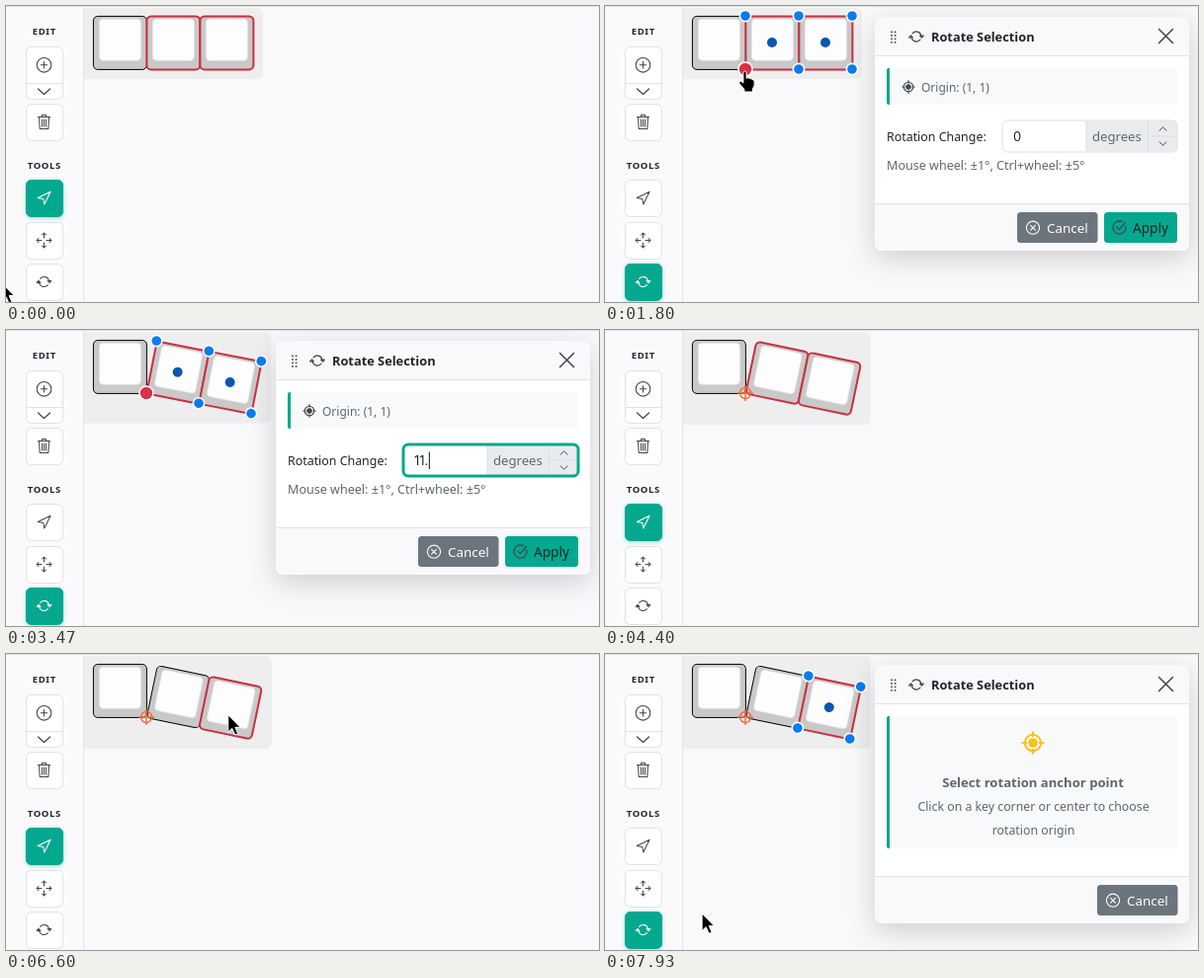
An HTML page that plays this animation: 600x300 px, repeating every 8 s.

```html
<!DOCTYPE html>
<html lang="en">
<head>
<meta charset="utf-8">
<title>Rotate selection</title>
<style>
html, body { margin: 0; width: 100%; height: 100%; overflow: hidden; background: #f9f9fb; }
svg { display: block; width: 600px; height: 300px; font-family: "Noto Sans", "Open Sans", sans-serif; }
.icon { fill: none; stroke: #3f454b; stroke-linejoin: round; stroke-linecap: round; }
.btn > rect { fill: #fff; stroke: #dfe2e6; }
.btn.on > rect { fill: #04a88e; stroke: #04a88e; }
.btn.on { filter: drop-shadow(0 1px 2px rgba(4, 168, 142, .4)); }
.btn.on .icon { stroke: #fff; }
.head { font-size: 9.5px; font-weight: 700; letter-spacing: .6px; fill: #23282d; }
.cap { fill: #c9c9c9; stroke: #000; }
.picked .cap { stroke: #cb2f41; stroke-width: 2; }
.dot { fill: #0a7cf0; stroke: #fff; stroke-width: 1.6; }
.mid { fill: #0a57ae; }
.window { filter: drop-shadow(0 8px 14px rgba(0, 0, 0, .17)); }
.muted { fill: #5f676e; }
.dark { fill: #212529; }
.light { fill: #fff; }
.light .icon, .icon.light { stroke: #fff; fill: none; }
.b { font-weight: 600; }
</style>
</head>
<body>
<svg id="stage" viewBox="0 0 600 300"></svg>
<script>
const ICONS = {
  add: "M-7.3 0A7.3 7.3 0 1 1 7.3 0A7.3 7.3 0 1 1-7.3 0M-3.2 0H3.2M0-3.2V3.2",
  trash: "M-6-5H6M-2-5V-7H2V-5M-5-5L-4.3 7H4.3L5-5M-2-2.5V4.5M0-2.5V4.5M2-2.5V4.5",
  select: "M6.5-6.3L-6.3 0L-.7 1L.3 6.5Z",
  move: "M0-7.5V-2.5M0 2.5V7.5M-7.5 0H-2.5M2.5 0H7.5M-2-5.5L0-7.5L2-5.5M-2 5.5L0 7.5L2 5.5M-5.5-2L-7.5 0L-5.5 2M5.5-2L7.5 0L5.5 2",
  rotate: "M-3.9-3.2A5 5 0 0 1 4.9-1M3.9 3.2A5 5 0 0 1-4.9 1M3.7-1H7.3L5.5 1.2ZM-3.7 1H-7.3L-5.5-1.2Z",
  cancel: "M-6.6 0A6.6 6.6 0 1 1 6.6 0A6.6 6.6 0 1 1-6.6 0M-2.4-2.4L2.4 2.4M2.4-2.4L-2.4 2.4",
  apply: "M6.4-1.5A6.6 6.6 0 1 1 3-5.9M-2.8-.6L-.2 2.2L6-5",
  close: "M-7-7L7 7M7-7L-7 7",
  down: "M-6-2.5L0 3L6-2.5",
  tick: "M-3.5 1.7L0-1.7L3.5 1.7"
};
const icon = (name, x, y, w = 1, extra = "") =>
  `<path class="icon ${extra}" stroke-width="${w}" transform="translate(${x} ${y})" d="${ICONS[name]}"/>`;
const rect = (x, y, w, h, r, attrs) => `<rect x="${x}" y="${y}" width="${w}" height="${h}" rx="${r}" ${attrs}/>`;
const text = (s, x, y, size, cls = "dark", attrs = "") =>
  `<text class="${cls}" x="${x}" y="${y}" font-size="${size}" ${attrs}>${s}</text>`;
const dot = (x, y, r = 5.6, cls = "dot") => `<circle class="${cls}" cx="${x}" cy="${y}" r="${r}"/>`;
const button = (id, y) =>
  `<g class="btn" id="${id}">${rect(20.5, y + .5, 37, 37, 5, "")}${icon(id, 38.5, y + 18.5, 1.05)}</g>`;
const key = i => {
  const x = 88.4 + 54 * i;
  return `<g id="key${i}">${rect(x, 10.4, 54, 54, 4.5, 'class="cap"')}
    ${rect(x + 6, 13.2, 42, 42, 4, 'fill="#fdfdfd" stroke="#e6e6e6" stroke-width=".8"')}</g>`;
};
const corners = x => [10, 64].map(y => dot(x, y)).join("");
const centre = 'text-anchor="middle"';

const target = (x, y, k, color) => `<g transform="translate(${x} ${y}) scale(${k})" fill="none" stroke="${color}" stroke-width="2">
  <circle r="8.2"/><circle r="3.8" fill="${color}"/><path d="M0-11.5V-6M0 6V11.5M-11.5 0H-6M6 0H11.5"/></g>`;

const cancel = (x, y) => `<g class="light">${rect(x, y, 81.5, 31, 3.5, 'fill="#6c757d"')}
  ${icon("cancel", x + 16, y + 15.7, 1.1)}${text("Cancel", x + 30, y + 20.8, 13.4, "light")}</g>`;

const frame = bottom => `<rect class="window" x="273" y="11" width="318" height="${bottom - 11}" rx="7" fill="#fff"/>
  <path d="M273 50V18a7 7 0 0 1 7-7H584a7 7 0 0 1 7 7V50ZM273 ${bottom - 48}V${bottom - 7}a7 7 0 0 0 7 7H584a7 7 0 0 0 7-7V${bottom - 48}Z" fill="#f9f9fb"/>
  <path d="M273 50.5H591M273 ${bottom - 47.5}H591" stroke="#dfe2e6"/>
  <path d="M290 25.5V38M293.6 25.5V38" stroke="#555" stroke-width="1.7" stroke-dasharray="1.7 1.8"/>
  ${icon("rotate", 315, 31, 1.2)}${text("Rotate Selection", 330, 36, 12.8, "dark b")}
  ${icon("close", 567.5, 30.5, 1.5)}`;
const notice = h => rect(285, 63, 294, h, 4, 'fill="#f8f9fa"') +
  `<path d="M288 63V${63 + h}H287a2 2 0 0 1-2-2V65a2 2 0 0 1 2-2Z" fill="#04a88e"/>`;

stage.innerHTML = `
  <rect width="600" height="300" fill="#f9f9fb"/>
  <rect id="board" x="73" y="2" rx="6" fill="#eeeeef"/>
  <rect width="78" height="300" fill="#fafafc"/>
  <path d="M0 .5H600M78.5 0V300" stroke="#e3e4e8"/>
  ${text("EDIT", 38.8, 29, 9.5, "head", centre)}${text("TOOLS", 38.8, 165, 9.5, "head", centre)}
  <g class="btn">${rect(20.5, 41.5, 37, 53, 5, "")}<path d="M20.5 78.5H57.5" stroke="#dfe2e6"/>
    ${icon("add", 38.5, 59.8, 1.05)}${icon("down", 38.5, 86.5, 1.2)}</g>
  ${button("trash", 99)}${button("select", 176)}${button("move", 219)}${button("rotate", 261)}
  ${key(0)}
  <g id="spun">${key(1)}${key(2)}
    <g id="firstDots">${corners(142)}${dot(169, 37, 5, "mid")}</g>
    <g id="lastDots">${corners(196)}${corners(250)}${dot(223, 37, 5, "mid")}</g>
  </g>
  <circle id="anchor" cx="142" cy="64" r="7" fill="#d7324a" stroke="#fff" stroke-width="1.6"/>
  <g id="origin" fill="none" stroke="#f0683c" stroke-width="1.4"><circle cx="142" cy="64" r="5.5"/><path d="M134 64H150M142 56V72"/></g>
  <g id="ask">${frame(273)}${notice(134)}${target(433, 90, 1, "#fcc21b")}
    ${text("Select rotation anchor point", 433, 135, 13.1, "muted b", centre)}
    ${text("Click on a key corner or center to choose", 433.5, 159, 12.3, "muted", centre)}
    ${text("rotation origin", 433.5, 183, 12.3, "muted", centre)}${cancel(498, 234)}</g>
  <g id="form">${frame(248)}${notice(37)}${target(307, 82, .58, "#3f454b")}
    ${text("Origin: (1, 1)", 320, 87, 12, "muted")}
    ${text("Rotation Change:", 285, 137, 12.4)}
    ${rect(402.5, 116.5, 176, 31, 4, 'fill="#fff"')}
    <path d="M487 116.5H575a4 4 0 0 1 4 4V143.5a4 4 0 0 1-4 4H487Z" fill="#e9ebef"/>
    <path d="M487 116.5V147.5M549.5 116.5V147.5M549.5 132H579" stroke="#dcdfe3"/>
    ${text("degrees", 493, 137, 13.1, "muted")}
    ${icon("tick", 564.5, 124.5)}<g transform="translate(564.5 139.5) scale(1 -1)">${icon("tick", 0, 0)}</g>
    <rect id="ring" x="402" y="116" width="177" height="32" rx="5" fill="none"/>
    <rect id="mark" x="412" y="123" width="10" height="18" fill="#a6cdf3"/>
    ${text("", 413, 137, 13, "dark", 'id="value" style="font-family:Inter,sans-serif"')}
    <path id="caret" stroke="#111"/>
    ${text("Mouse wheel: ±1°, Ctrl+wheel: ±5°", 285, 166, 12.55, "muted")}
    ${cancel(417, 209)}${rect(505, 209, 74, 31, 3.5, 'fill="#04a88e"')}
    ${icon("apply", 520.5, 224.5, 1.2)}${text("Apply", 534, 229.8, 13.6)}</g>
  <g id="mouse" stroke="#fff" stroke-linejoin="round">
    <path id="arrow" d="M0 0V17.5L4 13.7L7 20.3L10 19L7.1 12.6H12.3Z" fill="#000"/>
    <path id="hand" d="M-1.6 1.2Q0-1.4 1.6 1.2V7.2Q3.4 5.8 4.7 7.6Q6.4 6.8 7.4 8.6Q9.5 8 9.6 10.6V14.5L8 18V21H-.6V18.6L-5.6 12.4Q-6.2 9.8-3.8 10.2L-1.6 12Z" fill="#000"/>
    <path id="beam" d="M-3-8Q0-8 0-6Q0-8 3-8M0-6V6M-3 8Q0 8 0 6Q0 8 3 8" fill="none" stroke="#111" stroke-width="1.3"/>
  </g>`;

const $ = id => document.getElementById(id);
const show = (id, on) => $(id).style.display = on ? "" : "none";

// Pointer stops: time, x, y
const PATH = [
  [0, -4, 281], [350, 38, 281], [560, 38, 281], [930, 99.5, 150.5], [1270, 141.5, 66], [1800, 141.5, 66],
  [2330, 430, 131], [2450, 430, 131], [2670, 409, 131],
  [5130, 365, 98], [5620, 229, 57], [6430, 229, 57], [6600, 225, 61.5], [7200, 42, 267], [7330, 39, 274],
  [7530, 39, 274], [7930, 98, 263], [8000, 101, 261]
];
const ENTRIES = [[0, "0"], [2870, "1"], [3070, "11"], [3400, "11."], [3800, "11.7"], [4000, "11.75"]];
const OPEN = 500, PICK = 1600, FOCUS = 2400, TYPE = 2870, APPLY = 4400, TOGGLE = 5800, REOPEN = 7400;

// Slope at a stop; zero next to a rest
function slope(i, c) {
  const a = PATH[i - 1], p = PATH[i], b = PATH[i + 1];
  if (!a || !b || a[c] === p[c] || b[c] === p[c]) return 0;
  return (b[c] - a[c]) / (b[0] - a[0]);
}
function along(t, c) {
  let i = 0;
  while (i < PATH.length - 2 && PATH[i + 1][0] <= t) i++;
  const [p, q] = [PATH[i], PATH[i + 1]], d = q[0] - p[0], u = (t - p[0]) / d, v = 1 - u;
  return v * v * (1 + 2 * u) * p[c] + u * u * (1 + 2 * v) * q[c]
    + d * u * v * (v * slope(i, c) - u * slope(i + 1, c));
}

function draw(t) {
  const asking = t >= OPEN && t < PICK || t >= REOPEN;
  const editing = t >= PICK && t < APPLY;
  const turning = asking || editing;
  const both = t < TOGGLE;
  const entry = ENTRIES.filter(e => e[0] <= t).pop()[1];
  const angle = parseFloat(entry), rad = angle * Math.PI / 180;

  $("select").classList.toggle("on", !turning);
  $("rotate").classList.toggle("on", turning);
  $("key1").classList.toggle("picked", both);
  $("key2").classList.add("picked");
  $("spun").setAttribute("transform", `rotate(${angle} 142 64)`);
  $("board").setAttribute("width", 142 + 108 * Math.cos(rad) + 54 * Math.sin(rad) + 10 - 73);
  $("board").setAttribute("height", 64 + 108 * Math.sin(rad) + 10 - 2);
  show("firstDots", turning && both);
  show("lastDots", turning);
  show("anchor", editing);
  show("origin", t >= APPLY);
  show("ask", asking);
  show("form", editing);

  if (editing) {
    const focused = t >= FOCUS;
    $("ring").setAttribute("stroke", focused ? "#04a88e" : "#dcdfe3");
    $("ring").setAttribute("stroke-width", focused ? 3 : 1);
    $("value").textContent = entry;
    show("mark", t >= 2600 && t < TYPE);
    show("caret", focused && (t < 2600 || t >= TYPE));
    $("caret").setAttribute("d", `M${414 + $("value").getComputedTextLength()} 123.5V141`);
  }

  const x = along(t, 1), y = along(t, 2);
  const overTool = x > 20 && x < 58 && y > 176;
  const overDot = t < 2000 && Math.hypot(x - 142, y - 64) < 7;
  const overInput = editing && x > 402 && x < 487 && y > 116 && y < 148;
  show("mouse", t < TYPE || t >= 5130);
  show("hand", overTool || overDot);
  show("beam", overInput);
  show("arrow", !overTool && !overDot && !overInput);
  $("mouse").setAttribute("transform", `translate(${x} ${y})`);
}

const start = performance.now();
function tick(now) {
  draw(Math.max(0, now - start) % 8000);
  requestAnimationFrame(tick);
}
draw(0);
requestAnimationFrame(tick);
</script>
</body>
</html>
```
